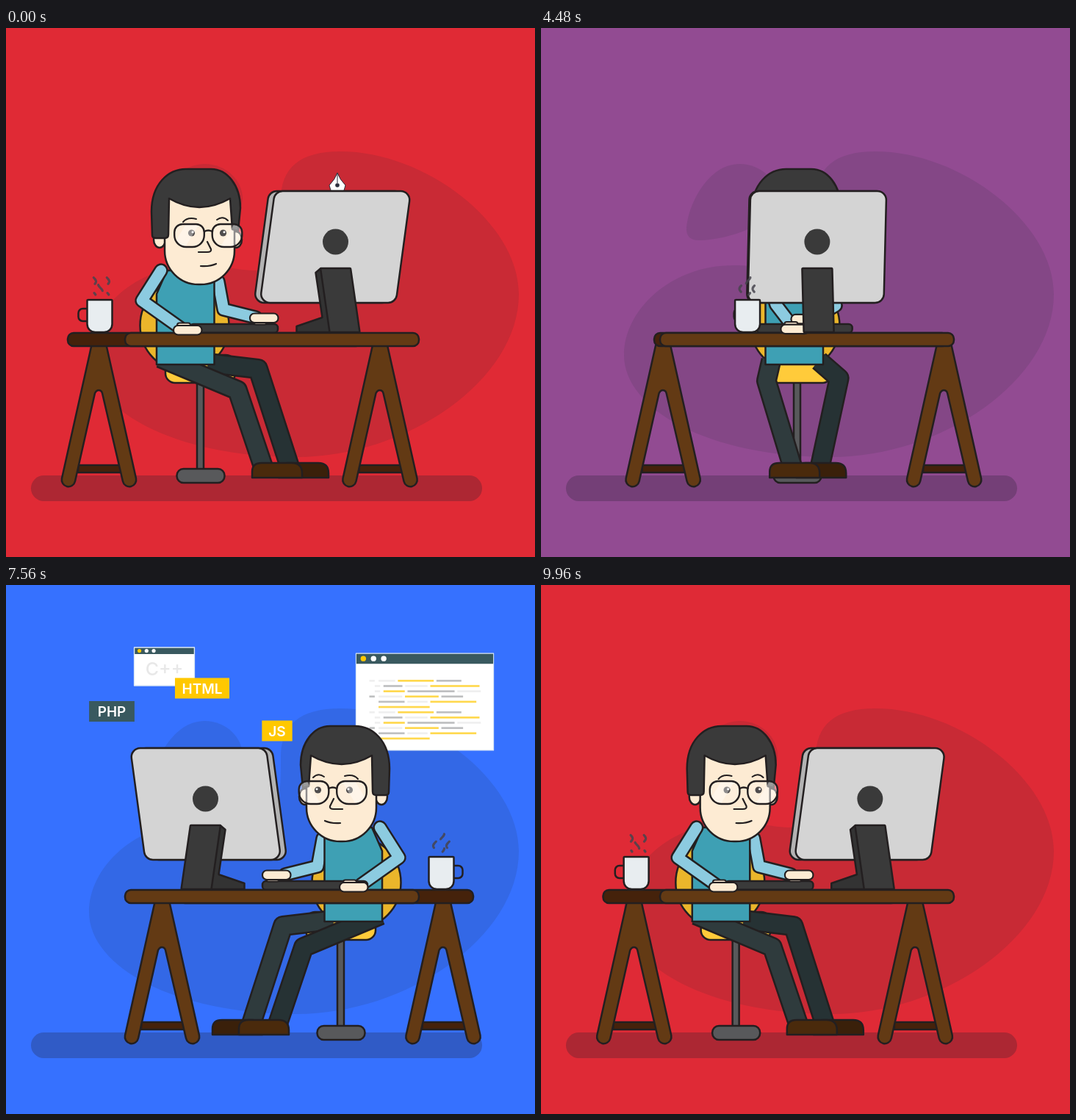
An HTML page with a canvas for the animation above (10000 ms loop, 720 by 720 pixels).

```html
<!DOCTYPE html>
<html lang="en">
<head>
<meta charset="utf-8">
<title>At the desk</title>
<style>
  html, body { margin: 0; width: 100%; height: 100%; overflow: hidden; background: #e02a35; }
  canvas { display: block; width: 100vw; height: 100vh; }
</style>
</head>
<body>
<canvas id="stage" width="720" height="720"></canvas>
<script>
const ctx = document.getElementById('stage').getContext('2d');
const SIZE = 720, LOOP = 10000;
const INK = '#231f20', SKIN = '#fdebd3', DARK = '#3a3a3a', NAVY = '#2b2f3d';
const YELLOW = '#ffc800', SLATE = '#39595f', WOOD = '#633a14', DEEP_WOOD = '#45220b';

// ---------- motion ----------
const clamp = (v, a = 0, b = 1) => Math.min(b, Math.max(a, v));
const mix = (a, b, p) => a + (b - a) * p;
const mirror = x => SIZE - x;
const easeQuad = u => u < .5 ? 2 * u * u : 1 - 2 * (1 - u) * (1 - u);
const smooth = u => u * u * (3 - 2 * u);

// 0 = facing right, 1 = facing left; lag lets parts trail the desk
function turn(t, lag = 1) {
  const swing = from => easeQuad(clamp((t - from) / 1000)) ** lag;
  return swing(4000) - swing(9000);
}

// Springy entrance landing at `land`, then a swell and shrink from `leave`
function pop(t, land, leave) {
  const out = t - leave, s = (t - land) / 1000;
  if (out > 0) return out < 320 ? 1 + .42 * smooth(out / 320) : Math.max(0, 1.42 * (1 - (out - 320) / 250));
  if (s < 0) return Math.max(0, 1 + 5 * s);
  return 1 + .53 * Math.exp(-2 * s) * Math.sin(4 * Math.PI * s);
}

function random(seed) {
  return () => (seed = seed * 16807 % 2147483647) / 2147483647;
}

// ---------- drawing ----------
function paint(path, fill, line = INK, width = 2.5) {
  if (fill) { ctx.fillStyle = fill; ctx.fill(path); }
  if (line) { ctx.strokeStyle = line; ctx.lineWidth = width; ctx.stroke(path); }
}
const shape = (d, fill, line, width) => paint(new Path2D(d), fill, line, width);
function box(x, y, w, h, r, fill, line, width) {
  const p = new Path2D();
  p.roundRect(x, y, w, h, r);
  paint(p, fill, line, width);
}
function oval(x, y, rx, ry, fill, line = null, width = 2.5) {
  const p = new Path2D();
  p.ellipse(x, y, rx, ry, 0, 0, 7);
  paint(p, fill, line, width);
}
const disc = (x, y, r, fill) => oval(x, y, r, r, fill);

function roundPoly(points, r, fill) {
  const p = new Path2D(), n = points.length, [a, b] = points;
  p.moveTo((a[0] + b[0]) / 2, (a[1] + b[1]) / 2);
  for (let i = 1; i <= n; i++) p.arcTo(...points[i % n], ...points[(i + 1) % n], r);
  p.closePath();
  paint(p, fill);
}
function limb(points, width, color, cap) {
  const p = new Path2D();
  ctx.lineCap = cap;
  for (const point of points) p.lineTo(...point);
  paint(p, null, INK, width + 2.5);
  paint(p, null, color, width - 2.5);
}
function at(x, y, sx, sy, draw) {
  if (!sx) return;
  ctx.save();
  ctx.translate(x, y);
  ctx.scale(sx, sy);
  draw();
  ctx.restore();
}
function label(text, x, y, font, color, align = 'center') {
  ctx.font = font;
  ctx.fillStyle = color;
  ctx.textAlign = align;
  ctx.fillText(text, x, y);
}

function backdrop(p) {
  ctx.fillStyle = `rgb(${mix(224, 54, p)},${mix(42, 113, p)},${mix(53, 255, p)})`;
  ctx.fillRect(0, 0, SIZE, SIZE);
  const tint = 'rgba(35,40,50,.12)';
  shape('M374 235C374 190 400 168 455 168C570 168 698 265 698 362C698 480 545 584 395 584C230 584 113 520 113 445C113 385 175 323 262 323C300 323 315 330 340 330C374 330 374 280 374 235Z', tint, null);
  shape('M198 272C200 240 228 185 270 185C300 185 322 208 322 232C322 268 250 289 215 289Q197 289 198 272Z', tint, null);
  box(34, 609, 614, 35, 17.5, 'rgba(35,31,45,.27)', null);
}

// ---------- design icons ----------
function pen(x, y) {
  at(x, y, 1, 1, () => {
    shape('M0 0Q3 9 11 17L7 31H-7L-11 17Q-3 9 0 0Z', '#fff', NAVY, 1);
    shape('M0 1V14', null, NAVY, 1);
    disc(0, 17, 2.8, NAVY);
    box(-9, 30, 18, 7, 1, NAVY, null);
  });
}
function drawnSquare(t) {
  const s = pop(t, -2000, 3400), h = 31, side = 2 * h;
  at(498, 142, s, s, () => {
    const d = 4 * side * easeQuad(clamp((t - 600) / 1450));
    const tipX = h - clamp(d, 0, side) + clamp(d - 2 * side, 0, side);
    const tipY = -h + clamp(d - side, 0, side) - clamp(d - 3 * side, 0, side);
    if (d > 0) {
      ctx.lineCap = 'butt';
      ctx.lineJoin = 'miter';
      ctx.setLineDash([d, 999]);
      shape(`M${h} ${-h}H${-h}V${h}H${h}Z`, null, '#fff', 3.6);
      ctx.setLineDash([]);
    }
    const rise = 1 - (1 - clamp(t / 500)) ** 2;
    pen(mix(-47, tipX, rise), mix(55, tipY, rise));
  });
}
function textFrame(t) {
  const s = pop(t, 500, 3350);
  at(251, 116, s, s, () => {
    ctx.lineCap = 'butt';
    ctx.setLineDash([5, 4]);
    box(-71, -28, 142, 57, 0, null, '#7c2030', 1);
    ctx.setLineDash([]);
    for (const x of [-70, 70]) for (const y of [-26, 27]) disc(x, y, 6.5, NAVY);
    const typed = 'Text'.slice(0, clamp(Math.floor((t - 900) / 300), 0, 4));
    ctx.fontKerning = 'none';
    label(typed, -54, 20, 'italic 300 53px "Open Sans", sans-serif', '#fff', 'left');
  });
}
function designIcons(t) {
  if (t > 4000) return;
  drawnSquare(t);
  const s = pop(t, 900, 3300);
  at(466.5, 182, s, s, () => oval(0, 0, 25, 25, null, 'rgba(232,218,218,.88)', 3.6));
  textFrame(t);
}

// Glides in from the right, hovers mid-stage, then speeds away
function plane(t) {
  const u = (t - 1700) / 1060;
  if (u < -1.3 || u > 1.3) return;
  at(400 - 135 * u - 205 * u ** 3, 450 - 50 * u, 1, 1, () => {
    shape('M-32 11L18 -27L17 -11Z', '#fff', null);
    shape('M-32 11L17 -13L32 -3L-9 13Z', '#d5d1d8', null);
    shape('M-32 11L-14 13L-12 19L-6 15L16 28L32 -3L-14 13Z', '#fff', null);
  });
}

// ---------- code icons ----------
function browser(w, h, bar, r) {
  box(-w / 2, -h / 2, w, h, 0, '#fff', null);
  box(-w / 2, -h / 2, w, bar, 0, SLATE, null);
  for (let i = 0; i < 3; i++) disc(-w / 2 + r * (2.7 + 3.75 * i), (bar - h) / 2, r, i ? '#fff' : YELLOW);
  box(-w / 2, -h / 2, w, h, 0, null, '#dbe8f5', 1.4);
}
function codeLines() {
  const tones = ['#e9e9e9', '#a2a4a5', YELLOW];
  for (let row = 0; row < 12; row++) {
    const kind = row % 6, y = -40.5 + row * 9.65, rand = random(977 + kind * 7919);
    const bar = (x, w, tone) => { ctx.fillStyle = tones[tone]; ctx.fillRect(x, y, w, 3.6); };
    const inset = kind === 1 || kind === 2;
    if (kind < 4) bar(inset ? -92 : -102, 10, kind === 3 ? 1 : 0);
    let x = inset ? -76 : -85;
    for (let i = 0; x < (kind < 5 ? 60 : -84); i++) {
      const w = kind < 5 ? 30 + 70 * rand() : 94;
      bar(x, Math.min(w, 103 - x), kind < 5 ? (kind + 2 * i) % 3 : 2);
      x += w + 5;
    }
  }
}
function tag(text, w, color) {
  box(-w / 2, -14, w, 28, 0, color, null);
  label(text, 0, 7, '600 19px Inter, sans-serif', '#fff');
}
function codeIcons(t) {
  if (t < 4700 || t > 9000) return;
  const show = (x, y, land, leave, draw) => {
    const s = pop(t, land, leave);
    at(x, y, s, s, () => draw(s));
  };
  show(570, 159, 5250, 8250, s => {
    ctx.scale(.743, .743);
    browser(253, 178, 19, 5);
    ctx.globalAlpha = clamp(.7 + .8 * (s - 1));
    codeLines();
  });
  show(215.5, 111, 5095, 8110, () => {
    browser(82, 52, 9, 2.6);
    label('C++', 0, 12, '500 25px Inter, sans-serif', '#e8e8e8');
  });
  show(267, 140.5, 5042, 7951, () => tag('HTML', 74, YELLOW));
  show(144, 172, 5135, 8250, () => tag('PHP', 62, SLATE));
  show(369, 198.5, 5430, 8030, () => tag('JS', 41, YELLOW));
}

// ---------- man ----------
// A left part ends where its right partner's reflection lies, and vice versa
const swapSides = (own, partner, p, nudge) =>
  own.map(([x, y], i) => [mix(x, mirror(partner[i][0]), p) + nudge[i], mix(y, partner[i][1], p)]);

function head(t, p) {
  const dir = 1 - 2 * p, d = Math.abs(dir);
  at(mix(259, mirror(259), p), 0, dir < 0 ? -1 : 1, 1, () => {
    for (const x of [-50, 54]) oval(x, 288, 8, 11, SKIN, INK);
    box(-47.5 + 4.5 * d, 215, 95, 134, [20, 20, 46, 46], SKIN);
    const l = -42 + 5 * d, r = 42 + 4 * d;
    shape(`M-60 282L-61 250C-61 212 -38 192 -14 192H20C42 192 60 214 60 245L57 276L${r + 3} 274L${r} 232Q4 256 ${l} 232L${l - 1} 281Q${l - 1} 286 ${l - 6} 286H-55Q-60 286 -60 282Z`, DARK);
    ctx.translate(15 * d - 15, 0);
    ctx.lineCap = 'round';
    shape('M-18 264Q-12 257 0 260M28 261Q36 255 43 262', null, INK, 2);
    shape('M15 291L20 301Q21 305 15 305H3', null, INK, 2.2);
    shape('M6 324Q18 325 27 321', null, INK, 2.2);
    const lid = 1 - .6 * clamp(1.6 - Math.abs(t - 2760) / 75);
    for (const x of [-6.5, 36.5]) at(x, 279, 1, lid, () => {
      disc(0, 0, 4.6, INK);
      disc(1.5, -1.3, 1.5, '#fff');
    });
    for (const [x, shine] of [[-9.5, -24], [42, -10]]) {
      const lens = new Path2D();
      lens.roundRect(x - 20.3, 267, 40.6, 31, [11, 11, 16, 16]);
      ctx.save();
      ctx.clip(lens);
      box(x - 21, 266, 42, 33, 0, 'rgba(255,255,255,.2)', null);
      for (const w of [12, 6])
        shape(`M${x + shine + 24 - 2 * w} 299l20 -33h${w}l-20 33Z`, 'rgba(255,255,255,.36)', null);
      ctx.restore();
      paint(lens, null, INK, 2.4);
    }
    shape('M11 277Q16 274 22 277', null, INK, 2.4);
  });
}
function shoe(x, color) {
  shape(`M${x} 612V604q0 -12 13 -12H${x + 54}q14 0 14 14V612Z`, color);
}
function man(t, p) {
  const flipped = p > .5, arch = Math.sin(Math.PI * p), shift = mix(0, 191, p);
  const layer = (left, right) => flipped ? [left, right] : [right, left];

  oval(mix(243, mirror(243), p), 405, 60.5, 62, '#ebb62b', INK);
  box(260 + shift, 480, 9, 124, 0, '#58595b');
  box(232.5 + shift, 600, 65, 19, 9, '#58595b');
  box(217 + shift, 445, 95, 38, 13, '#ffcb3a');

  const near = [[210, 449], [315, 493], [351, 600]], far = [[275, 456], [343, 464], [387, 600]];
  const leg = (own, partner, side, color) => () =>
    limb(swapSides(own, partner, p, [0, 36 * side * arch, 0]), 25.5, color, 'butt');
  layer(leg(near, far, -1, '#2f3b3d'), leg(far, near, 1, '#263234')).forEach(draw => draw());

  const shoes = layer(mix(335, mirror(439), p), mix(371, mirror(403), p));
  shoe(shoes[0], '#3a200a');
  shoe(shoes[1], '#4a2a0c');

  const close = [[211, 330], [185, 371], [237, 408]], away = [[289, 345], [296, 383], [340, 394]];
  const arm = (own, partner, side) => () =>
    limb(swapSides(own, partner, p, [0, side > 0 ? 30 * arch : 0, 40 * side * arch]), 17, '#8ccbe0', 'round');
  const [backArm, frontArm] = layer(arm(close, away, 1), arm(away, close, -1));
  const x = mix(205, 433.5, p), a = 14 * (1 - p), b = 14 * p;
  backArm();
  shape(`M${x} 458V362L${x + a} 330H${x + 78.5 - b}L${x + 78.5} 362V458Z`, '#3ea0b4');
  frontArm();
  head(t, p);
}
function hands(p) {
  const gather = 46 * Math.sin(Math.PI * p), lift = 16.5 * p ** 3;
  const hand = (x, y, thumb) => {
    box(x + 5, y + thumb, 18, 6, 3, SKIN, INK, 2);
    box(x, y, 38.5, 12.5, 6, SKIN, INK, 2.2);
  };
  hand(mix(332, 454, p) - gather, 388.5 + lift, p > .5 ? -3.5 : 9);
  hand(mix(228, 349, p) + gather, 405 - lift, p > .5 ? 9 : -3.5);
}

// ---------- furniture ----------
function trestle(x) {
  at(x, 0, 1, 1, () => {
    box(-28, 595, 59, 10, 0, DEEP_WOOD);
    shape('M-8 425L-50 613A9 9 0 0 0 -32 617L-5 497Q-3 493 0 493Q4 493 5 497L33 617A9 9 0 0 0 51 613L9 425Z', WOOD);
  });
}
function desk(p) {
  for (const x of [126, 508.5]) trestle(x + 86 * p);
  box(84 + 152 * p, 415, 400, 18, 8, DEEP_WOOD);
  box(162, 415, 400, 18, 8, WOOD);
}
function monitor(p) {
  const x = mix(448.5, mirror(448.5), p), dir = 1 - 2 * p;
  const slab = (cx, half, lean, top, bottom, r, color) => roundPoly(
    [[cx - half, top], [cx + half, top], [cx + half + lean, bottom], [cx - half + lean, bottom]], r, color);
  slab(x + 2 * dir, 92.5, -20.5 * dir, 222, 374, 12, '#b3b3b3');
  slab(x + 10 * dir, 92.5, -20.5 * dir, 222, 374, 12, '#d4d4d4');
  disc(x, 291, 17.5, DARK);
  at(x, 0, dir, 1, () => shape('M-27 333L-20 327L12 414H-53V406L-18 394Z', '#333'));
  slab(x, 20.5, 12.5 * dir, 327, 414, 1, DARK);
}
function cup(t, p) {
  const x = mix(127.5, mirror(127.5), p), dir = 1 - 2 * p;
  box(x - 16 * dir - 13, 382, 26, 17, 6, null);
  box(x - 17, 370, 34, 44, [1, 1, 11, 11], '#e8edf0');
  ctx.save();
  ctx.lineCap = 'round';
  ctx.setLineDash([10, 15]);
  for (const side of [-1, 0, 1]) {
    const wisp = new Path2D();
    for (let y = 363; y >= 339; y--) wisp.lineTo(x + 1 + 9 * side + 3 * Math.cos((y - 345) / 3.2 + (side ? 0 : 2)), y);
    ctx.lineDashOffset = -t / 40 - (side ? 18 : 6);
    paint(wisp, null, 'rgba(70,68,78,.85)', 3.2);
  }
  ctx.restore();
}

function draw(t) {
  const body = turn(t, 1.06), keys = mix(250, 349, body);
  ctx.lineJoin = 'round';
  backdrop(turn(t));
  designIcons(t);
  codeIcons(t);
  man(t, body);
  box(keys, 403, mix(120, 143, body), 12, 5, DARK);
  desk(turn(t));
  hands(body);
  monitor(turn(t, 1.15));
  cup(t, turn(t, 1.43));
  plane(t);
}

let start;
function tick(now) {
  start ??= now;
  draw((now - start) % LOOP);
  requestAnimationFrame(tick);
}
requestAnimationFrame(tick);
</script>
</body>
</html>
```
